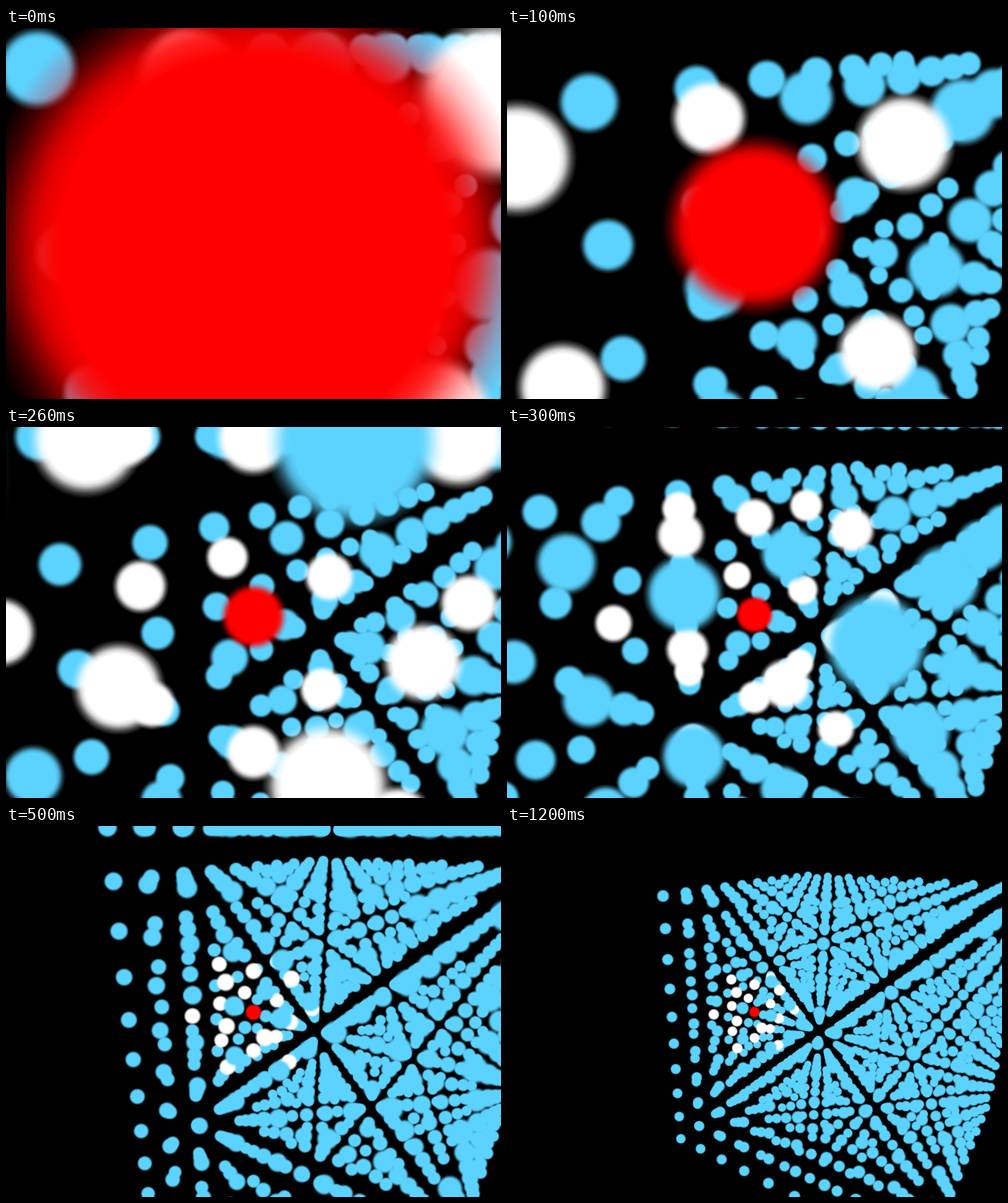
These frames come from a looping animation (800x601 px, 1.6 s). An HTML page with a canvas:

```html
<!DOCTYPE html>
<html lang="en">
<head>
<meta charset="utf-8">
<title>Lattice zoom</title>
<style>
  html, body { margin: 0; width: 100%; height: 100%; overflow: hidden; background: #000; }
  canvas { display: block; }
</style>
</head>
<body>
<canvas id="stage" width="800" height="601"></canvas>
<script>
const canvas = document.getElementById('stage');
const ctx = canvas.getContext('2d');

const LOOP = 1600, STEP = 100;
const DISTANCES = [0.33, 0.995, 2.69, 4.66, 6.53, 10.48, 15.6];
const CENTER_X = 400, CENTER_Y = 300;
const FOCAL = canvas.height / 2 / Math.tan(Math.PI / 8);
const SPRITE = canvas.height / 4;    // sprite radius in pixels at depth 1
const NEAR = 0.1;
const LIFT = 0.026;                  // the red point sits slightly below the aim

// Lattice axes in camera space: x right, y down, z away.
const azimuth = 35.6 * Math.PI / 180, tilt = 21.58 * Math.PI / 180;
const ca = Math.cos(azimuth), sa = Math.sin(azimuth);
const ct = Math.cos(tilt), st = Math.sin(tilt);
const AXIS_A = [-ca, -sa * st, sa * ct];
const AXIS_B = [-sa, ca * st, -ca * ct];
const AXIS_C = [0, -ct, -st];

function softDisc(rgb) {
  const g = ctx.createRadialGradient(0, 0, 0, 0, 0, 1);
  const falloff = [[0.69, 1], [0.765, 0.88], [0.8, 0.76], [0.865, 0.45], [0.915, 0.24], [0.97, 0.08], [1, 0]];
  for (const [r, alpha] of falloff) g.addColorStop(r, `rgba(${rgb},${alpha})`);
  return g;
}
const RED = softDisc('255,0,0');
const WHITE = softDisc('255,255,255');
const BLUE = softDisc('92,211,255');

// Red centre, white first and second neighbours, blue for the rest.
function paintFor(a, b, c) {
  const d2 = a * a + b * b + c * c;
  return d2 === 0 ? RED : d2 <= 2 ? WHITE : BLUE;
}

const points = [];
for (let a = -7; a <= 2; a++)
  for (let b = -7; b <= 2; b++)
    for (let c = -5; c <= 4; c++) {
      const [x, y, z] = [0, 1, 2].map(i => a * AXIS_A[i] + b * AXIS_B[i] + c * AXIS_C[i]);
      points.push({ x, y: y + LIFT, z, paint: paintFor(a, b, c) });
    }
points.sort((p, q) => q.z - p.z);

function draw(distance) {
  ctx.setTransform(1, 0, 0, 1, 0, 0);
  ctx.fillStyle = '#000';
  ctx.fillRect(0, 0, canvas.width, canvas.height);
  for (const p of points) {
    const depth = p.z + distance;
    if (depth < NEAR) break;
    const r = SPRITE / depth;
    const x = CENTER_X + FOCAL * p.x / depth;
    const y = CENTER_Y + FOCAL * p.y / depth;
    if (x + r < 0 || x - r > canvas.width || y + r < 0 || y - r > canvas.height) continue;
    ctx.setTransform(r, 0, 0, r, x, y);
    ctx.fillStyle = p.paint;
    ctx.beginPath();
    ctx.arc(0, 0, 1, 0, 2 * Math.PI);
    ctx.fill();
  }
}

let shown = -1;
function tick() {
  const step = Math.min(DISTANCES.length - 1, Math.floor(performance.now() % LOOP / STEP));
  if (step !== shown) draw(DISTANCES[shown = step]);
  requestAnimationFrame(tick);
}
tick();
</script>
</body>
</html>
```
